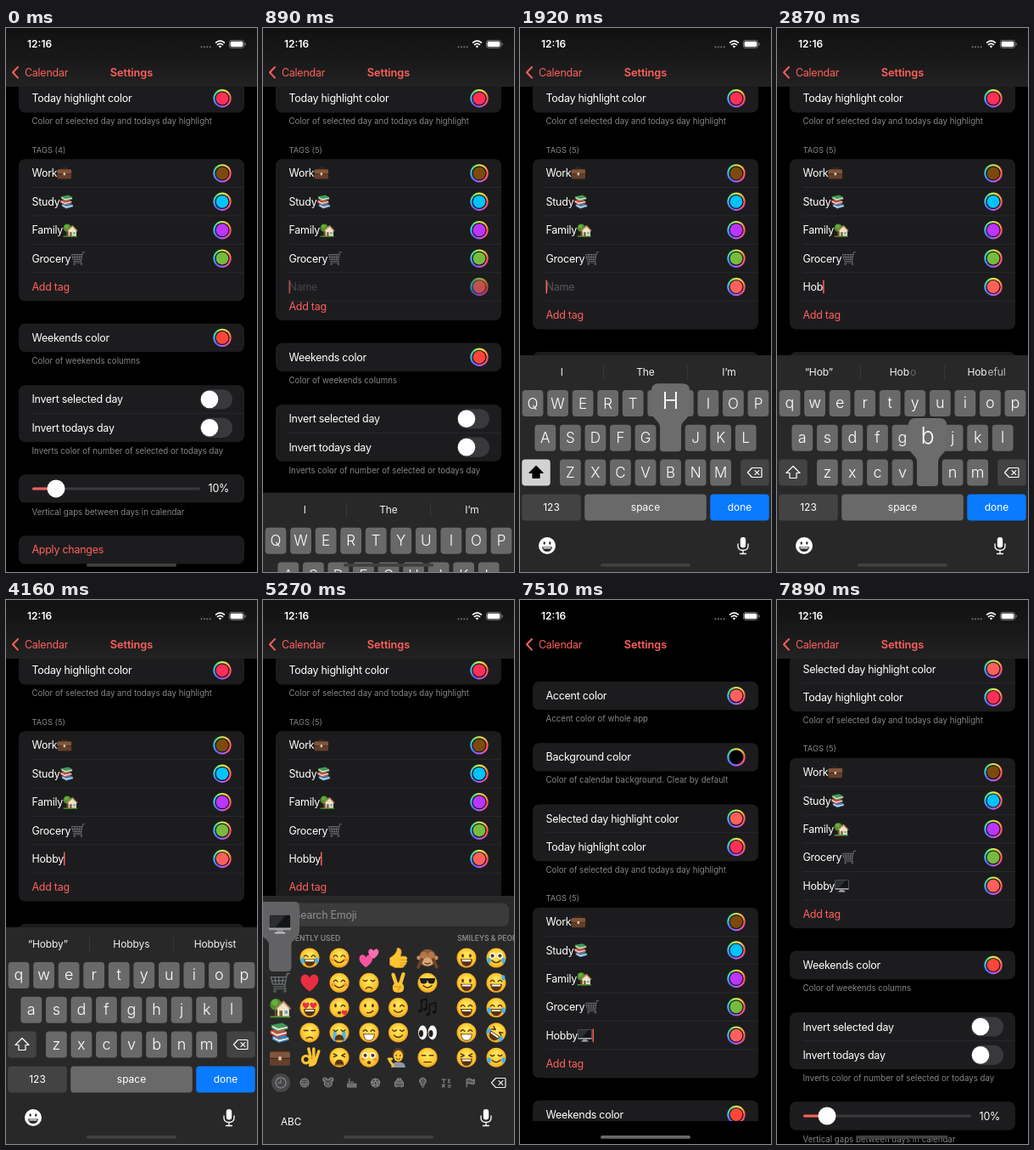
Write an HTML page with a canvas that moves like this. It is 296x640 px and loops after 8000 ms.

```html
<!DOCTYPE html>
<html lang="en">
<head>
<meta charset="utf-8">
<title>Settings</title>
<style>
html, body { margin: 0; width: 100%; height: 100%; overflow: hidden; background: #000; }
canvas { display: block; width: 296px; height: 640px; }
</style>
</head>
<body>
<canvas id="stage"></canvas>
<script>
const W = 296, H = 640, ROW = 33.4, LOOP = 8000;
const RED = '#ff605c', CARD = '#1c1c1e', GRAY = '#86868b';
const cv = document.getElementById('stage'), c = cv.getContext('2d');
const dpr = window.devicePixelRatio || 1;
cv.width = W * dpr;
cv.height = H * dpr;

// The picture only changes at these moments: [first, last, count]
const steps = [0];
[[780, 1430, 7], [1630, 1630, 1], [1810, 2040, 3], [2180, 2870, 7], [2990, 2990, 1], [3130, 3930, 8],
 [4030, 4160, 2], [4320, 4760, 5], [5040, 5270, 3], [5830, 5940, 2], [6180, 6300, 2], [6840, 7510, 7],
 [7690, 7890, 3]].forEach(([a, b, n]) => {
  for (let i = 0; i < n; i++) steps.push(Math.round((a + (b - a) * i / Math.max(1, n - 1)) / 10) * 10);
});

const ramp = (t, a, b) => Math.min(1, Math.max(0, (t - a) / (b - a)));
const easeOut = u => 1 - (1 - u) ** 3;
const smooth = u => u * u * (3 - 2 * u);
const smoother = u => u * u * u * (10 - 15 * u + 6 * u * u);
const latest = (list, t) => list.filter(e => e[0] <= t).pop()[1];

const typed = [[0, ''], [1930, 'H'], [2290, 'Ho'], [2870, 'Hob'], [3240, 'Hobb'], [3700, 'Hobby']];
const presses = [[1810, 2040, 'h'], [2180, 2400, 'o'], [2750, 2990, 'b'], [3130, 3350, 'b'], [3580, 3810, 'y']];
const hints = [
  [0, ['I', 'The', 'I’m']], [1930, ['“H”', 'He', 'Have']], [2290, ['“Ho”', 'Hoo', 'Hopeful']],
  [2870, ['“Hob”', 'Hob~o', 'Hob~eful']], [2990, ['“Hob”', 'Hobby', 'Hobbies']],
  [3240, ['“Hobb”', 'Hobby', 'Hobbies']], [3700, ['“Hobby”', 'Hobbys', 'Hobbyist']]];

// ---- drawing helpers
function text(s, x, y, size, color = '#fff', { weight = 400, align = 'left', track = 0 } = {}) {
  c.font = `${weight} ${size}px Inter, "Liberation Sans", sans-serif`;
  c.letterSpacing = track + 'px';
  const w = c.measureText(s).width;
  c.textAlign = 'left';
  c.fillStyle = color;
  c.fillText(s, x - (align === 'center' ? w / 2 : align === 'right' ? w : 0), y + size * .36);
  return w;
}
const body = (s, x, y, color, align) => text(s, x, y, 12.5, color, { align, track: -.27 });
function box(x, y, w, h, r, fill) {
  c.beginPath();
  c.roundRect(x, y, w, h, r);
  c.fillStyle = fill;
  c.fill();
}
function dot(x, y, r, fill, ry = r) {
  c.beginPath();
  c.ellipse(x, y, r, ry, 0, 0, 7);
  c.fillStyle = fill;
  c.fill();
}
function path(d, fill, stroke, w = 1) {
  const p = new Path2D(d);
  if (fill) { c.fillStyle = fill; c.fill(p); }
  if (stroke) {
    c.strokeStyle = stroke;
    c.lineWidth = w;
    c.lineCap = c.lineJoin = 'round';
    c.stroke(p);
  }
}
function at(x, y, scale, draw) {
  c.save();
  c.translate(x, y);
  c.scale(scale, scale);
  draw();
  c.restore();
}

// ---- emoji, in a box of -10..10
const HEART = 'M0 8.5C-14-1-8-9-3.5-8Q-.8-7.4 0-4.6Q.8-7.4 3.5-8C8-9 14-1 0 8.5Z';
const EYES = {
  o: 'M-1.1 0a1.1 1.8 0 1 0 2.2 0a1.1 1.8 0 1 0-2.2 0', '^': 'M-1.9.8Q0-2 1.9.8', u: 'M-1.9-.5Q0 1.6 1.9-.5',
  '-': 'M-1.9 0H1.9', x: 'M-1.8-1.5L1.5 0L-1.8 1.5'
};
const MOUTHS = {
  s: 'M-4.2 2.6Q0 6.8 4.2 2.6', D: 'M-5.4 1.6H5.4Q4.8 7.8 0 7.8Q-4.8 7.8-5.4 1.6Z', f: 'M-3 5.6Q0 3.2 3 5.6',
  '-': 'M-3.5 4.5H3.5', k: 'M-2 5Q2 5.6 4 3', o: 'M-1.6 5a1.6 1.3 0 1 0 3.2 0a1.6 1.3 0 1 0-3.2 0',
  A: 'M-4 7Q-4 2.4 0 2.4T4 7Z'
};
MOUTHS.T = MOUTHS.D;

function face([eyes, mouth, extra]) {
  const ink = '#5a3210', g = c.createRadialGradient(0, -3, 2, 0, 0, 10);
  g.addColorStop(0, '#ffe45c');
  g.addColorStop(.7, '#fdc930');
  g.addColorStop(1, '#ee9a1e');
  if (extra === 'r') c.rotate(.6);
  dot(0, 0, 9.6, g);
  if (extra === 'b') for (const s of [-1, 1]) dot(s * 6, 1.8, 2.2, 'rgba(245,95,60,.5)', 1.6);
  if (extra === 'c') for (const s of [-1, 1]) box(s * 4.4 - 1.7, -1.5, 3.4, 10, 1.2, '#48b6f5');
  for (const s of [-1, 1]) at(s * 3.7, -2, 1, () => {
    c.scale(-s, 1);
    const e = eyes === 'w' ? (s < 0 ? 'o' : '^') : eyes;
    if (e === 'h') at(0, 0, .38, () => path(HEART, '#ee2d41'));
    else if (e === 'O') { dot(0, 0, 2.9, '#fff'); dot(0, 0, 1.7, ink); }
    else if (e === 'g') path('M-4-2.5H4L3 2Q0 4-3 2Z', '#1d1d22');
    else path(EYES[e], e === 'o' && ink, ink, e === 'o' ? .1 : 1.2);
  });
  const open = 'DTAo'.includes(mouth);
  path(MOUTHS[mouth], open && (mouth === 'T' ? '#fff' : ink), ink, open ? .7 : 1.2);
  if (mouth === 'D') box(-4.4, 1.9, 8.8, 1.7, .5, '#fff');
  if ('tr'.includes(extra || '-')) for (const s of [-1, 1]) dot(s * 7, 2.6, 1.8, '#3fb2f5', 2.8);
  if (extra === 'd') dot(7, -5, 1.7, '#3fb2f5', 2.6);
  if (extra === 'l') at(5, 5, .32, () => path(HEART, '#ee2d41'));
}
const SKIN = '#fcc433', SHADE = '#dd951c';
const ART = {
  pc() {
    box(-10, -8.5, 20, 14, .8, '#9b9da1');
    box(-9.6, -8.1, 19.2, 11.6, .5, '#131416');
    path('M-9-7.5H5L-4 2.8H-9Z', '#2b2d31');
    path('M-2.5 5.5H2.5L3.5 8H-3.5Z', '#8d9095');
    box(-5, 7.6, 10, 1.2, .5, '#c9cbce');
  },
  cart() {
    path('M9.5-9H7L4.5 4H-6.5M6-5.5H-9L-7 1.5H5M-5-5.5L-4 1.5M-1-5.5V1.5M3-5.5L2 1.5M-8-2H5', 0, '#6d7175', 1.1);
    path('M4.5 4L6 6H-6', 0, '#63676b', 1);
    dot(-5, 8, 1.6, '#555');
    dot(5, 8, 1.6, '#555');
  },
  house() {
    dot(-4, -3, 5.8, '#4e8f2c');
    dot(-5, -5, 3, '#6cab3c');
    box(-5.2, 1, 2, 8, 0, '#744b26');
    path('M-2.5 0L3.5-5L9 0V9H-2.5Z', '#efe3c4');
    path('M-4 1L3.5-6L10 1', 0, '#b98a5e', 1.5);
    box(-.5, 3, 3, 6, 0, '#8a5a30');
    box(4.5, 3, 3, 3, 0, '#5aa5cf');
    path('M-9 9H9.5', 0, '#4f9a2f', 1.6);
  },
  books() {
    [['#2f80c3', 3], ['#d8423c', -2.5], ['#3f9d54', -8]].forEach(([col, y], i) => {
      const x = [1, -1, 0][i];
      path(`M${x - 8} ${y + .5}L${x + 2} ${y - 1.5}L${x + 7.5} ${y + 1.5}L${x - 2} ${y + 4}Z`, col);
      path(`M${x - 8} ${y + .8}L${x - 2} ${y + 4}L${x + 7.5} ${y + 1.8}V${y + 4}L${x - 2} ${y + 6.6}L${x - 8} ${y + 3.4}Z`, '#e9e4d6');
      path(`M${x - 8} ${y + .8}V${y + 3.4}L${x - 2} ${y + 6.6}L${x + 7.5} ${y + 4}`, 0, col, 1.2);
    });
  },
  case() {
    path('M-3.5-5V-7.5H3.5V-5', 0, '#3f2618', 1.6);
    box(-10, -5.5, 20, 13.5, 1.6, '#63402b');
    box(-10, -5.5, 20, 6.3, 1.6, '#80553a');
    path('M-9.5 1H9.5', 0, '#402618', .9);
    box(-1.5, -.8, 3, 3.6, .5, '#d8c9a8');
  },
  heart() { path(HEART, '#ea2e3f'); },
  hearts() {
    at(-3, 3, .75, () => path(HEART, '#f7559f'));
    at(4.5, -4, .58, () => path(HEART, '#fb6fb0'));
  },
  thumb() {
    path('M-8 0Q-1-4-1-9.5Q3-10 3-5L2-1.5H7Q10 0 8 2Q9.5 4 7.5 5Q8 7 6 7.5Q6 9.5 3 9.5H-3L-8 7Z', SKIN, SHADE, .7);
    path('M2 2H8M2 5H7.5M2 7.5H6', 0, SHADE, .8);
  },
  victory() {
    path('M-2 1L-5-8M2 1L5-8.5', 0, SKIN, 3.6);
    box(-5.5, 0, 11, 9.5, 4, SKIN);
    path('M-4 4H3Q0 5 0 8', 0, SHADE, 1);
  },
  ok() {
    path('M1 0L-1-8.5M4 1L4-8.5M6 3L9-6', 0, SKIN, 2.9);
    path('M-1 9Q8 9 7 2L0 1Z', SKIN);
    c.beginPath();
    c.arc(-3.5, 2, 3.6, 0, 7);
    c.lineWidth = 2.6;
    c.strokeStyle = SKIN;
    c.stroke();
  },
  monkey() {
    dot(0, 0, 8.5, '#8b5a35');
    dot(0, 3.5, 6, '#d9a878', 4.5);
    path('M-2.5 5Q0 7 2.5 5', 0, '#5a3210', 1);
    for (const s of [-1, 1]) {
      dot(s * 8.6, 0, 2, '#c58c5d');
      path(`M${s * 9} 9L${s * 4}-2`, 0, '#6f4527', 3.2);
      dot(s * 3.5, -2.5, 3.3, '#b27a4c');
    }
  },
  notes() {
    path('M-6 3V-7L-1-8.5V1M2 6V-3L8-5V4', 0, '#101012', 1.5);
    for (const [x, y] of [[-7.5, 3.5], [-2.5, 1.5], [.5, 6.5], [6.5, 4.5]]) dot(x, y, 2, '#101012', 1.5);
  },
  eyes() {
    for (const s of [-1, 1]) {
      dot(s * 4.8, 0, 4.3, '#f5f5f5', 7);
      dot(s * 4.8 - 1.5, 1, 2.1, '#2a1b12', 3.4);
    }
  },
  person() {
    path('M-5.5 0Q-7-9 0-9.5Q7-9 5.5 0Z', '#5b3a22');
    path('M-7 9.8Q-7 4.5 0 4.5Q7 4.5 7 9.8Z', '#8d98a3');
    dot(0, -1.5, 4.6, SKIN, 5.6);
    path('M-5 8L-8.5 3M-9.5 1.5H-6.5', 0, SKIN, 2.4);
    path('M-1.8 1.3Q0 2.9 1.8 1.3', 0, '#5a3210', .8);
    for (const s of [-1, 1]) dot(s * 2, -2, .7, '#5a3210');
  }
};
const emoji = (name, x, y, size) => at(x, y, size / 20, () => name[0] === ':' ? face(name.slice(1)) : ART[name]());

// ---- settings list
const RING = ['#ff5a4e', '#ff4fa0', '#b45cff', '#5b6bff', '#3db8f5', '#4fe08a', '#d0f04a', '#ffb84a', '#ff5a4e'];
function well(y, color) {
  const g = c.createConicGradient(0, 255, y);
  RING.forEach((col, i) => g.addColorStop(i / 8, col));
  dot(255, y, 10.7, g);
  dot(255, y, 8.6, '#141416');
  dot(255, y, 7.4, color);
}
function card(y, rows) {
  box(15, y, 266, rows * ROW, 7.5, CARD);
  for (let i = 1; i < rows; i++) {
    c.fillStyle = '#2c2c2f';
    c.fillRect(30, y + i * ROW - .4, 251, .8);
  }
}
const note = (s, y) => text(s, 30.5, y, 9.7, GRAY);
function colorRow(label, y, color) {
  body(label, 30.5, y);
  well(y, color);
}
function group(y, rows, hint) {
  card(y, rows.length);
  rows.forEach(([label, color], i) => colorRow(label, y + ROW * (i + .5), color));
  if (hint) note(hint, y + ROW * rows.length + 10.3);
}
const tags = [['Work', 'case', '#7c4a0c'], ['Study', 'books', '#00c2ff'], ['Family', 'house', '#bb35ff'], ['Grocery', 'cart', '#76bb40']];

function tagRow([name, icon, color], y) {
  const w = body(name, 30.5, y);
  if (icon) emoji(icon, 30.5 + w + 8.5, y, 16.4);
  well(y, color);
  return 30.5 + w + (icon ? 17.5 : 0);
}
function list(t, scroll) {
  const grow = smooth(ramp(t, 690, 1010));
  const extra = grow * ROW, y0 = -scroll;
  group(y0 + 95.9, [['Accent color', '#ff605c']], 'Accent color of whole app');
  group(y0 + 168.2, [['Background color', '#000']], 'Color of calendar background. Clear by default');
  group(y0 + 240.4, [['Selected day highlight color', '#ff605c'], ['Today highlight color', '#ff2f58']],
    'Color of selected day and todays day highlight');

  text(`TAGS (${grow ? 5 : 4})`, 30.5, y0 + 351, 9.4, GRAY);
  const top = y0 + 361.9;
  card(top, 5 + grow);
  tags.forEach((tag, i) => tagRow(tag, top + ROW * (i + .5)));
  if (grow) {
    c.globalAlpha = grow;
    const word = latest(typed, t), y = top + ROW * 4.5;
    const end = tagRow([word, t >= 5830 && 'pc', '#ff605c'], y);
    if (!word) body('Name', 30.5, y, '#58585c');
    if (t < 7690) box(end, y - 8, 1.5, 16, .7, RED);
    c.globalAlpha = 1;
  }
  body('Add tag', 30.5, top + ROW * (4.5 + grow), RED);

  const y1 = y0 + extra;
  group(y1 + 555.4, [['Weekends color', '#ff453a']], 'Color of weekends columns');
  card(y1 + 627.9, 2);
  ['Invert selected day', 'Invert todays day'].forEach((label, i) => {
    const y = y1 + 627.9 + ROW * (i + .5);
    body(label, 30.5, y);
    box(229, y - 11.6, 38, 23.2, 11.6, '#39393d');
    dot(240, y, 10.3, '#fff');
  });
  note('Inverts color of number of selected or todays day', y1 + 705);
  card(y1 + 732.9, 1);
  const ys = y1 + 749.6;
  box(31, ys - 1.5, 198, 3, 1.5, '#3a3a3d');
  box(31, ys - 1.5, 28, 3, 1.5, RED);
  dot(59, ys, 10.5, '#fff');
  body('10%', 263, ys, '#fff', 'right');
  note('Vertical gaps between days in calendar', y1 + 776.8);
  card(y1 + 804.9, 1);
  body('Apply changes', 30.5, y1 + 821.6, RED);
}

function header(scroll) {
  const g = c.createLinearGradient(0, 0, 0, 69);
  g.addColorStop(0, '#111');
  g.addColorStop(.55, '#191919');
  g.addColorStop(1, '#222');
  c.globalAlpha = Math.min(1, scroll / 30);
  box(0, 0, W, 69, 0, g);
  c.globalAlpha = 1;
  text('12:16', 25, 19, 12, '#fff', { weight: 600 });
  for (let i = 0; i < 4; i++) dot(230.5 + i * 3.4, 22.3, 1.1, '#6a6a6c');
  path('M247.6 17.2Q252.5 13 257.4 17.2M249.4 19.6Q252.5 17 255.6 19.6', 0, '#fff', 1.6);
  path('M250.7 21.4Q252.5 20 254.3 21.4L252.5 23.4Z', '#fff');
  path('M265.8 14.6H278.2Q280.6 14.6 280.6 17V21Q280.6 23.4 278.2 23.4H265.8Q263.4 23.4 263.4 21V17Q263.4 14.6 265.8 14.6Z', 0, '#8a8a8a', .8);
  box(264.6, 15.8, 14.8, 6.4, 1.6, '#fff');
  box(281.6, 17.5, 1.1, 3, .5, '#8a8a8a');
  path('M14 46L8 52.3L14 58.6', 0, RED, 2);
  body('Calendar', 22, 52.3, RED);
  text('Settings', 148, 52.3, 12.8, RED, { weight: 600, align: 'center', track: -.1 });
}

// ---- keyboards
const BACK = '#282828', KEY = '#696969', DARK = '#434343';
const DELETE = 'M-3.5-5.5H7Q8-5.5 8-4.5V4.5Q8 5.5 7 5.5H-3.5L-8.5 0ZM0-2.4L4.8 2.4M4.8-2.4L0 2.4';
const key = (x, y, w, fill) => box(x - w / 2, y - 15.5, w, 31, 4, fill);
const icon = (d, x, y, fill, stroke, w) => at(x, y, 1, () => path(d, fill, stroke, w));

function mic() {
  box(259.8, 599, 6.4, 12.5, 3.2, '#fff');
  path('M257 607V609Q257 614.5 263 614.5T269 609V607M263 614.5V618.5M259.5 618.5H266.5', 0, '#fff', 1.3);
}
function letters(t) {
  const caps = t < 1930;
  box(0, 385, W, 270, 0, BACK);
  latest(hints, t).forEach((hint, i) => {
    const [word, tail = ''] = hint.split('~'), x = 49.3 + i * 98.6;
    const opt = { align: 'center', track: -.1 };
    if (!tail) return text(word, x, 405, 12, '#f2f2f2', opt);
    c.font = '400 12px Inter, "Liberation Sans", sans-serif';
    const left = x - c.measureText(word + tail).width / 2;
    const w = text(word, left, 405, 12, '#f2f2f2', { track: -.1 });
    text(tail, left + w + 1, 405, 12, i > 1 ? '#bbb' : '#666', { track: -.1 });
  });
  for (const x of [98.6, 197.4]) box(x - .4, 397, .8, 17, 0, '#3c3c3c');

  const down = presses.find(p => t >= p[0] && t < p[1]);
  let popup;
  ['qwertyuiop', 'asdfghjkl', 'zxcvbnm'].forEach((row, r) => [...row].forEach((ch, i) => {
    const x = 148 + (i - (row.length - 1) / 2) * 29.55, y = 441.5 + r * 40.8;
    key(x, y, 24.8, KEY);
    const label = caps ? ch.toUpperCase() : ch;
    if (down && down[2] === ch) popup = [label, x, y];
    else text(label, x, caps ? y : y - 1, caps ? 17 : 18, '#fff', { weight: 350, align: 'center' });
  }));
  key(19, 523, 33.5, caps ? '#d2d2d2' : DARK);
  icon('M0-7.5L8 .5H4V6.5H-4V.5H-8Z', 19, 523, caps && '#000', caps ? '#000' : '#fff', 1.2);
  key(277, 523, 33.5, DARK);
  icon(DELETE, 277, 523, 0, '#fff', 1.2);
  key(37, 564, 69.5, DARK);
  key(148, 564, 143.6, KEY);
  key(259, 564, 69.5, '#0a7aff');
  [['123', 37], ['space', 148], ['done', 259]].forEach(([s, x]) => text(s, x, 564, 12, '#fff', { align: 'center' }));

  dot(32, 609, 10, '#fff');
  for (const s of [-1, 1]) dot(32 + s * 3.3, 606, 1.2, BACK, 1.7);
  path('M26 610.5H38Q37 616 32 616T26 610.5Z', BACK);
  box(27.5, 611.3, 9, 1.3, .6, '#fff');
  mic();

  if (popup) {
    const [ch, x, y] = popup;
    at(x, y, 1, () => path('M-14-64H14Q22.5-64 22.5-56V-32Q22.5-26 17-21Q12.5-17 12.5-12V12Q12.5 16 8.5 16H-8.5Q-12.5 16-12.5 12V-12Q-12.5-17-17-21Q-22.5-26-22.5-32V-56Q-22.5-64-14-64Z', '#6c6c6c'));
    text(ch, x, y - 44, 27, '#fff', { weight: 350, align: 'center' });
  }
}
const columns = [20, 55, 90, 125, 159.5, 194, 240, 275];
const grid = [
  'pc :^Dt :^sb hearts thumb monkey :oD :Ost', 'cart heart :^sb :uf victory :gs :oD :^Dd',
  'house :hD :wol :ok :ws notes :^D :^Dt', 'books :-f :uAc :^T :us eyes :^T :xDr',
  'case ok :xA :Oob person :-- :xD :ust'].map(row => row.split(' '));
const categories = [
  'M0-6A6 6 0 1 0 .1-6M0-3.5V0H-3', 'M0-5A5 5 0 1 0 .1-5M-2.5 1Q0 4 2.5 1M-2-1.5V-1M2-1.5V-1',
  'M-4-2A2 2 0 1 1-2-4Q0-5 2-4A2 2 0 1 1 4-2Q6 4 0 5Q-6 4-4-2M-1 1H1', 'M-5 1H5V5H-5ZM-4-1H2M-3-1V-5M-5 3H5',
  'M0-5A5 5 0 1 0 .1-5M0-2L2 0L1 2H-1L-2 0ZM0-2V-5M2 0L5-1M1 2L3 4M-1 2L-3 4M-2 0L-5-1',
  'M-5 4V0L-3-3H3L5 0V4ZM-5 0H5M-2-3V-5H2V-3M-3 4V5M3 4V5', 'M-1.5 3Q-1.5 1-3 0A3.6 3.6 0 1 1 3 0Q1.5 1 1.5 3ZM-1 5H1',
  'M-5-4H-1M-3-4V0M2-4L4 0M4-4L2 0M-5 2L-2 5M-2 2L-5 5M2 3H5M2 5H5', 'M-4 5V-4Q-1-6 1-4T5-4V1Q3 2 1 1T-4 1'];

function emojiKeys(t) {
  box(0, 348, W, 300, 0, BACK);
  box(6, 356.5, 284, 27.5, 7.5, '#3b3b3b');
  path('M20 365.2A4 4 0 1 0 20.1 365.2M23 372.3L26.6 376', 0, '#98989c', 1.4);
  body('Search Emoji', 36.5, 370.3, '#8f8f93');
  const opt = { weight: 600 };
  text('FREQUENTLY USED', 9, 397.5, 8.6, '#8a8a8d', opt);
  text('SMILEYS & PEOPLE', 229, 397.5, 8.6, '#8a8a8d', opt);
  grid.forEach((row, r) => row.forEach((name, i) => emoji(name, columns[i], 421 + r * 29.3, 24)));
  dot(21, 568, 11, '#48484a');
  categories.forEach((d, i) => icon(d, 21 + i * 27.9, 568, i && i !== 7 ? '#555558' : 0, '#8b8b8e', 1.1));
  icon(DELETE, 278, 568, 0, '#eee', 1.2);
  text('ABC', 21, 614, 11.7, '#fff');
  mic();
  if (t >= 5040 && t < 5830) {
    path('M0 355H37Q43 355 43 361V389Q43 394 38 398Q33.5 401 33.5 406V432Q33.5 437 28.5 437H12Q7 437 7 432V406Q7 401 2 398L0 396Z', '#626264');
    emoji('pc', 20, 381, 26);
  }
}
const shifted = (dy, draw) => {
  c.save();
  c.translate(0, dy);
  draw();
  c.restore();
};

function draw(t) {
  c.setTransform(dpr, 0, 0, dpr, 0, 0);
  box(0, 0, W, H, 0, '#000');
  const scroll = t < 7600 ? 207.7 * (1 - smoother(ramp(t, 6753, 7510))) : 176 * smooth(ramp(t, 7600, 7890));
  list(t, scroll);
  if (t >= 7510 && t < 7690) box(0, 613, W, 27, 0, '#000');

  const rise = easeOut(ramp(t, 830, 1256)), swap = smooth(ramp(t, 4200, 4760));
  const drop = 265 * smooth(ramp(t, 7060, 7510));
  if (rise && swap < 1) shifted(255 * (1 - rise), () => letters(t));
  if (swap && drop < 264) {
    c.globalAlpha = swap;
    shifted(37 * (1 - swap) + drop, () => emojiKeys(t));
    c.globalAlpha = 1;
  }
  header(scroll);
  box(95, 630, 106, 3.8, 1.9, t >= 7510 && t < 7690 ? '#6a6a6c' : '#414143');
}

let shown = -1;
function frame(now) {
  const time = now % LOOP, t = steps.filter(s => s <= time + .5).pop();
  if (t !== shown) draw(shown = t);
  requestAnimationFrame(frame);
}
requestAnimationFrame(frame);
</script>
</body>
</html>
```
